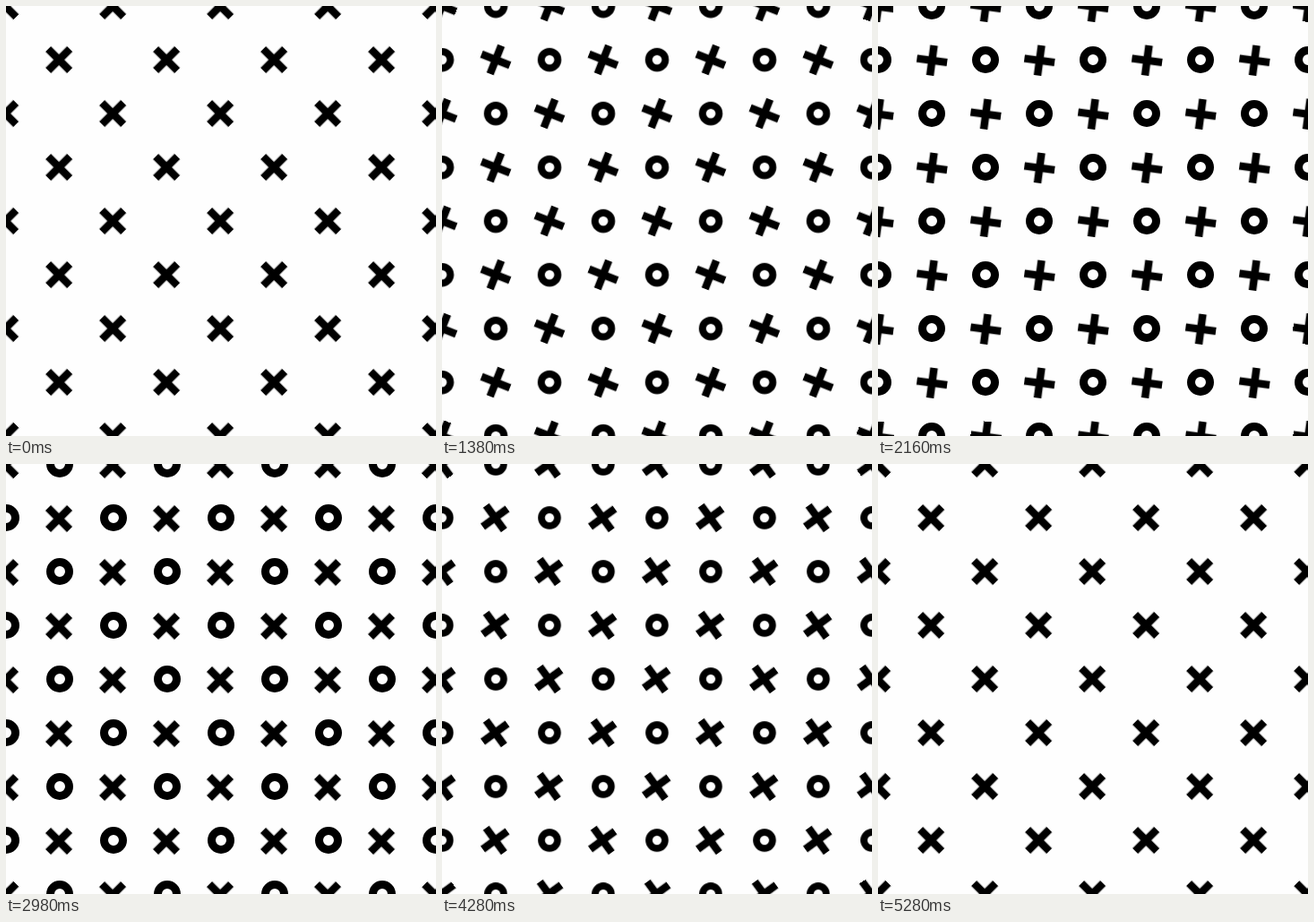
These frames come from a looping animation (480x480 px, 5.78 s). An HTML page:

```html
<!DOCTYPE html>
<html lang="en">
<head>
<meta charset="utf-8">
<title>Noughts and crosses</title>
<style>
html, body { margin: 0; width: 100%; height: 100%; overflow: hidden; background: #fefefe; }
svg { display: block; width: 100vw; height: 100vh; }
.cross { animation: turn 5780ms infinite cubic-bezier(.3, 0, .2, 1); }
.ring {
  fill: none; stroke: #000; stroke-width: 9;
  animation: pop 5780ms infinite cubic-bezier(.25, 0, 0, 1);
}

@keyframes turn {
  0%, 16.26% { transform: rotate(0deg); }
  33.18% { transform: rotate(90deg); }
  51.64% { transform: rotate(270deg); }
  71.28% { transform: rotate(360deg); }
  91.349% { transform: rotate(450deg); }
  91.35%, 100% { transform: rotate(0deg); }
}
@keyframes pop {
  0%, 15.225% { transform: scale(0); }
  32.18%, 71.765% { transform: scale(1); }
  91.349%, 100% { transform: scale(0); }
}
</style>
</head>
<body>
<svg id="stage" viewBox="0 0 480 480"></svg>
<script>
const STEP = 60;
const stage = document.getElementById('stage');

function add(parent, tag, attrs) {
  const el = document.createElementNS('http://www.w3.org/2000/svg', tag);
  for (const key in attrs) el.setAttribute(key, attrs[key]);
  return parent.appendChild(el);
}

function addCross(x, y) {
  // The pivot sits slightly off the middle of the cross
  const spot = add(stage, 'g', { transform: `translate(${x - 0.4} ${y + 0.6})` });
  const cross = add(spot, 'g', { class: 'cross' });
  add(cross, 'path', {
    d: 'M-17-4.3h34v8.6h-34zM-4.3-17h8.6v34h-8.6z',
    transform: 'translate(-.45 -.55) rotate(45)'
  });
}

function addRing(x, y) {
  const spot = add(stage, 'g', { transform: `translate(${x} ${y})` });
  add(spot, 'circle', { class: 'ring', r: 10.5 });
}

for (let row = 0; row <= 8; row++) {
  for (let col = 0; col <= 8; col++) {
    const place = (row + col) % 2 ? addRing : addCross;
    place(col * STEP, row * STEP);
  }
}
</script>
</body>
</html>
```
